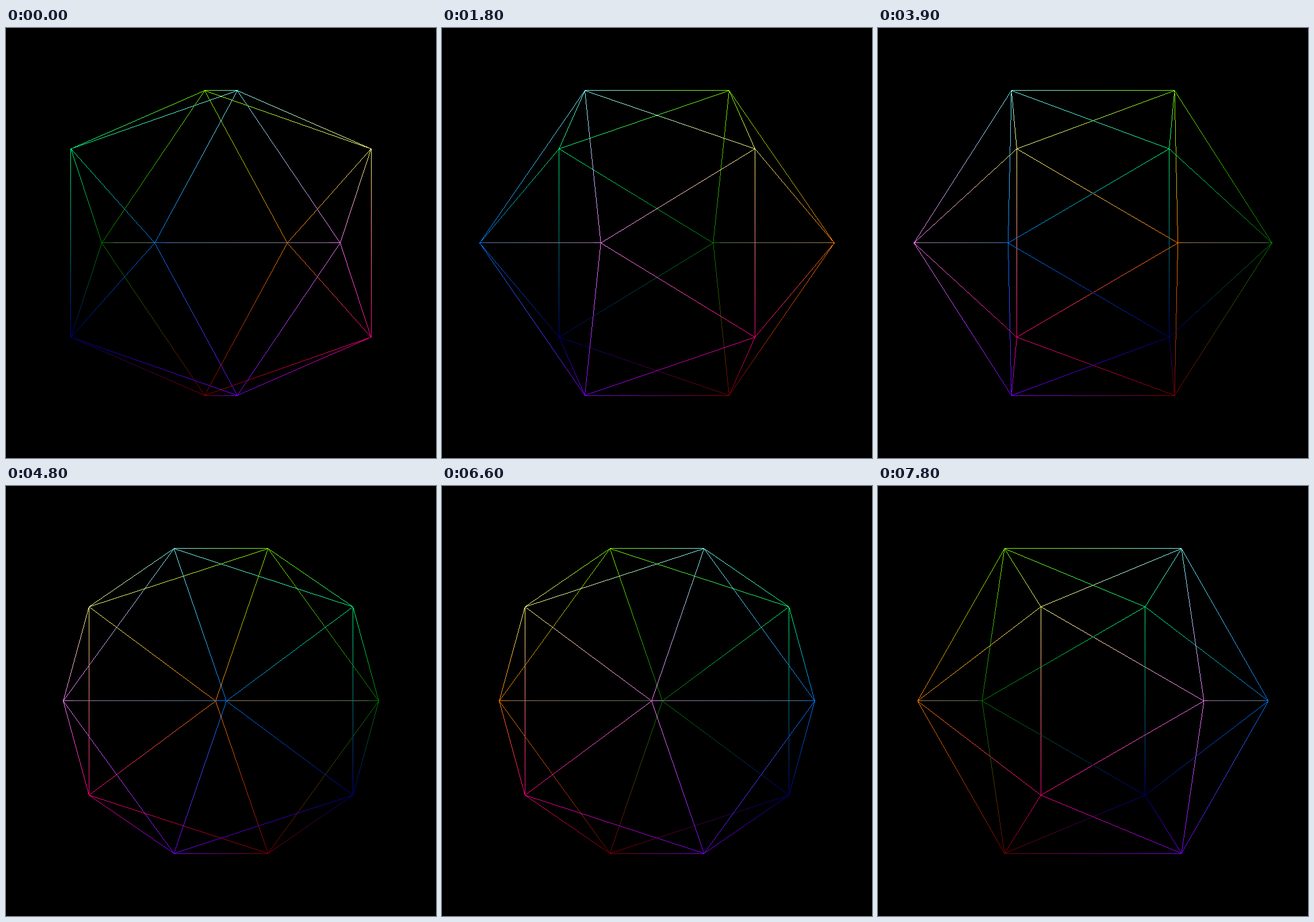
Write an HTML page with a canvas that moves like this. It is 748x748 px and loops after 8 s.

```html
<!DOCTYPE html>
<html lang="en">
<head>
<meta charset="utf-8">
<title>Turning icosahedron</title>
<style>
  html, body { margin: 0; width: 100%; height: 100%; overflow: hidden; background: #000; }
  canvas { display: block; width: 748px; height: 748px; }
</style>
</head>
<body>
<canvas id="stage" width="748" height="748"></canvas>
<script>
const SIZE = 748, MID = SIZE / 2, UNIT = 163.83;
const LOOP = 8000, STEP = 300, TURN = 10, START = -10;
const PHI = (1 + Math.sqrt(5)) / 2;

const ctx = document.getElementById('stage').getContext('2d');
const image = ctx.createImageData(SIZE, SIZE);
const pixels = new Uint32Array(image.data.buffer);
const BLACK = 0xff000000;

const lerp = (a, b, k) => a + (b - a) * k;
const channel = v => 255 * Math.min(1, Math.max(0, (v + 1) / 2));

// Cyclic permutations of (±1, ±PHI, 0); the colour follows the position.
const verts = [];
for (const a of [1, -1]) {
  for (const b of [PHI, -PHI]) {
    for (const [u, y, w] of [[a, b, 0], [0, a, b], [b, 0, a]]) {
      verts.push({ u, y, w, rgb: [channel(w), channel(y), channel(-u)] });
    }
  }
}

const edges = [];
verts.forEach((p, i) => verts.slice(i + 1).forEach(q => {
  const gap = Math.hypot(p.u - q.u, p.y - q.y, p.w - q.w);
  if (gap < 2.1) edges.push([p, q]);
}));

function plot(x, y, rgb) {
  const [r, g, b] = rgb.map(Math.round);
  pixels[(Math.ceil(y) - 1) * SIZE + Math.floor(x)] = BLACK | b << 16 | g << 8 | r;
}

// One-pixel line without smoothing, sampled at pixel centres.
function drawLine(p, q, muted) {
  const steep = Math.abs(q.y - p.y) > Math.abs(q.x - p.x);
  const axis = steep ? 'y' : 'x';
  if (p[axis] > q[axis]) [p, q] = [q, p];
  const from = p[axis], span = q[axis] - from;
  for (let c = Math.ceil(from - 0.5) + 0.5; c < q[axis]; c++) {
    const k = (c - from) / span;
    const grey = muted && k > 0.06 && k < 0.94 ? 0.7 : 0;
    const rgb = p.rgb.map((v, i) => lerp(lerp(v, q.rgb[i], k), 128, grey));
    plot(lerp(p.x, q.x, k), lerp(p.y, q.y, k), rgb);
  }
}

function draw(step) {
  const angle = (START + TURN * step) * Math.PI / 180;
  const sin = Math.sin(angle), cos = Math.cos(angle);
  const project = v => ({
    x: MID + UNIT * (v.u * sin + v.w * cos),
    y: MID - UNIT * v.y,
    rgb: v.rgb
  });
  pixels.fill(BLACK);
  for (const [p, q] of edges) {
    drawLine(project(p), project(q), p.y === 0 && q.y === 0);
  }
  ctx.putImageData(image, 0, 0);
}

let shown = -1;
const begin = performance.now();
function tick() {
  const step = Math.floor((performance.now() - begin) % LOOP / STEP);
  if (step !== shown) draw(shown = step);
  requestAnimationFrame(tick);
}
tick();
</script>
</body>
</html>
```
